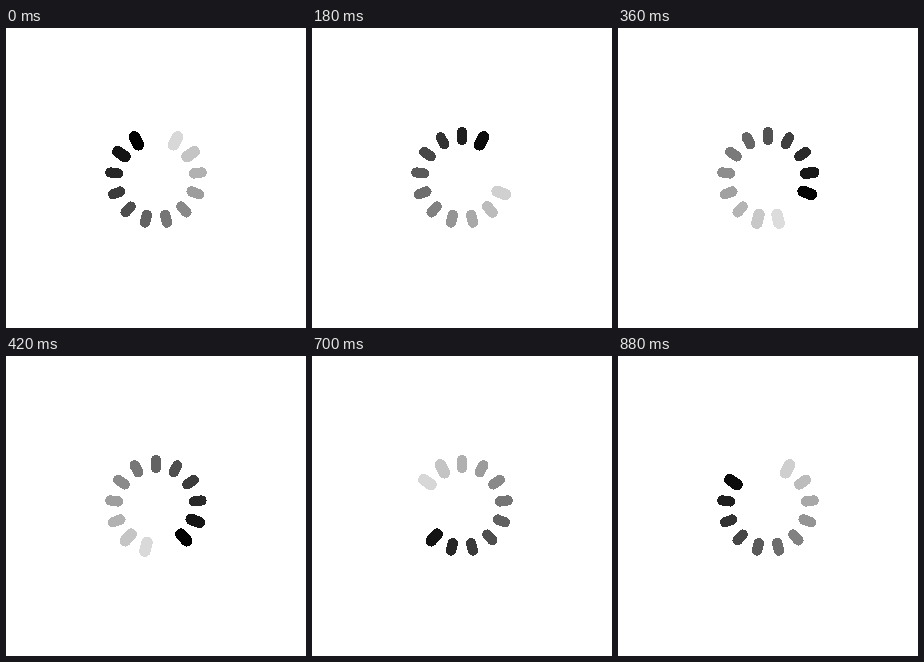
Write an HTML page that moves like this. It is 300x300 px and loops after 0.91 s.

```html
<!DOCTYPE html>
<html lang="en">
<head>
<meta charset="utf-8">
<title>Spinner</title>
<style>
  html, body { margin: 0; width: 100%; height: 100%; overflow: hidden; background: #fff; }
  svg { display: block; width: 100vw; height: 100vh; }
</style>
</head>
<body>
<svg id="stage" viewBox="0 0 300 300" shape-rendering="crispEdges"></svg>
<script>
const LOOP = 910, STEPS = 30, BARS = 13;
const RADIUS = 42, WIDTH = 11.6, LENGTH = 20.4;
const CUTOFF = 11.4; // bars older than this have faded away

const stage = document.getElementById('stage');
const bars = Array.from({ length: BARS }, () =>
  stage.appendChild(document.createElementNS('http://www.w3.org/2000/svg', 'rect')));

// Step starts fall on a 10 ms grid
const startOf = i => Math.round(i * LOOP / STEPS / 10 - 0.01) * 10;

function stepAt(t) {
  let i = STEPS - 1;
  while (i > 0 && startOf(i) > t) i--;
  return i;
}

const ramp = (x, x0, x1, y0, y1) =>
  y0 + (y1 - y0) * Math.min(1, Math.max(0, (x - x0) / (x1 - x0)));

// Full size when fresh, slimmer through the middle, full again near the end
const sizeAt = age => age < 5
  ? ramp(age, 1, 1.6, 1, 0.88)
  : ramp(age, 9.5, 9.9, 0.89, 1);

function render(t) {
  const head = BARS - 1 + stepAt(t) * BARS / STEPS;
  bars.forEach((bar, k) => {
    const age = (head - k + 1e-6) % BARS;
    const size = sizeAt(age);
    const w = WIDTH * size, h = LENGTH * size;
    const grey = Math.round(255 * age / BARS);
    const attrs = {
      x: -w / 2, y: -RADIUS - h / 2, width: w, height: h, rx: w / 2,
      fill: `rgb(${grey},${grey},${grey})`,
      transform: `translate(150 150) rotate(${k * 360 / BARS})`,
      visibility: age < CUTOFF ? 'visible' : 'hidden'
    };
    for (const name in attrs) bar.setAttribute(name, attrs[name]);
  });
}

const begin = performance.now();
function tick() {
  render((performance.now() - begin) % LOOP);
  requestAnimationFrame(tick);
}
render(0);
requestAnimationFrame(tick);
</script>
</body>
</html>
```
